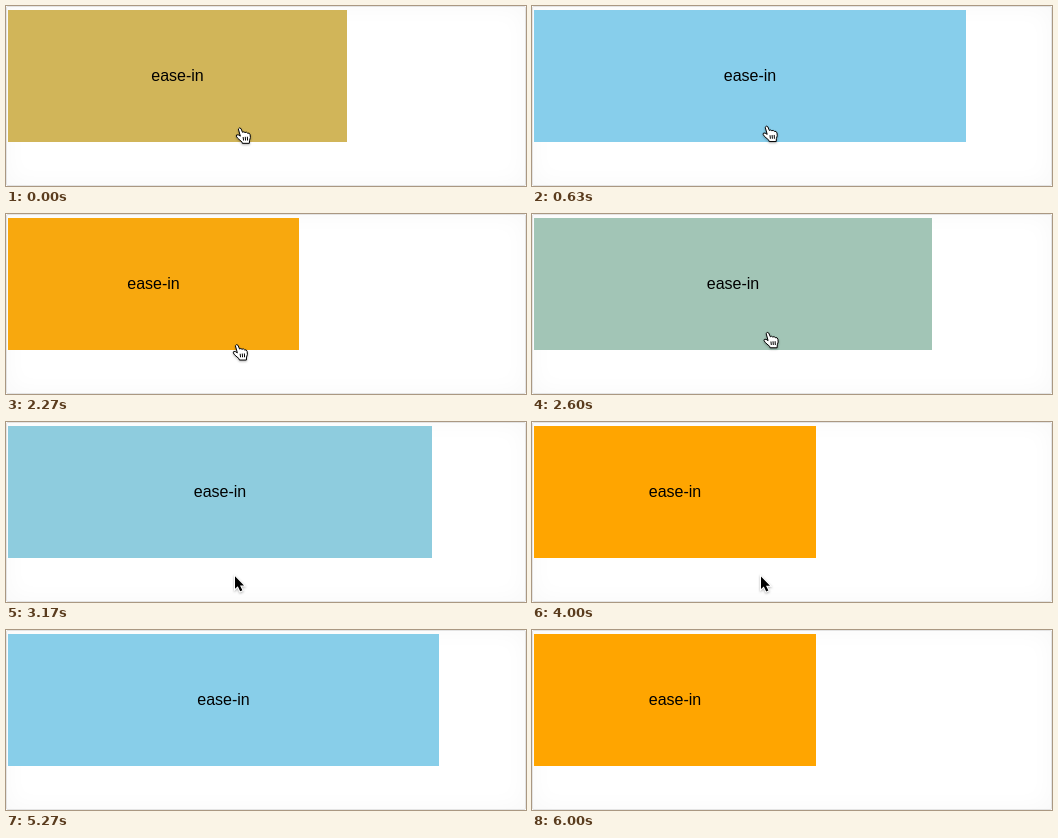
Recreate the animation shown at these times as an HTML page. Size 520 px wide and 180 px high, loop 6360 ms.

```html
<!DOCTYPE html>
<html lang="en">
<head>
<meta charset="utf-8">
<title>ease-in hover transition</title>
<style>
  html, body { margin: 0; width: 100%; height: 100%; overflow: hidden; background: #fff; }
  #frame {
    position: relative; box-sizing: border-box; width: 520px; height: 180px;
    border: 1px solid #e4e4e4; border-radius: 2px;
    box-shadow: inset 0 0 24px rgba(0, 0, 0, .03);
  }
  svg { position: absolute; left: -1px; top: -1px; }
  text { font: 16px "Liberation Sans", Arial, sans-serif; text-anchor: middle; }
  #arrow { stroke: #fff; stroke-width: 2; paint-order: stroke; }
  #hand { fill: #fff; stroke: #000; stroke-linejoin: round; }
  #cursor { filter: drop-shadow(0 1px 1px rgba(0, 0, 0, .3)); }
</style>
</head>
<body>
<div id="frame">
  <svg width="520" height="180">
    <rect id="box" x="2" y="4" height="132"/>
    <text id="label" y="75">ease-in</text>
    <g id="cursor">
      <path id="arrow" d="M0 0V12.5L2.8 9.9 5.2 15 7.4 14 5 9.2H9Z"/>
      <path id="hand" d="M-1.6 1.5Q-.6 -.4 1 1L2.6 4.8Q4 3.6 5 5 6.6 4 7.5 5.6 9.6 5 10.2 7.2 11 10 9.6 12.8L9.4 15.8H2.4L2 14.4-2.4 10.6Q-4.4 8.2 -3.4 7.4-2 6.6 .4 8.6ZM3.2 9.5L3.6 13M5.3 9.3L5.6 13M7.4 9.2L7.6 13"/>
    </g>
  </svg>
</div>
<script>
const LOOP = 6360, DURATION = 500;
const ORANGE = [255, 165, 0], SKY = [135, 206, 235];

// Times at which the pointer alternately enters and leaves the box
const toggles = [-278, 701, 2172, 3078, 4234, 5234];

// Pointer rest positions; it finally leaves through the bottom of the stage
const INSIDE = [236, 117.5], OUTSIDE = [229, 154.5], EXIT_Y = 215;

const $ = id => document.getElementById(id);
const mix = (a, b, k) => a + (b - a) * k;
const clamp = x => Math.min(1, Math.max(0, x));
const smooth = x => x * x * (3 - 2 * x);
const easeOut = x => 1 - (1 - x) ** 2;
const entering = i => i % 2 === 0;

// cubic-bezier(.42, 0, 1, 1)
function easeIn(x) {
  let low = 0, high = 1, s;
  for (let i = 0; i < 24; i++) {
    s = (low + high) / 2;
    const bx = 1.26 * s * (1 - s) ** 2 + 3 * s * s * (1 - s) + s ** 3;
    if (bx < x) low = s; else high = s;
  }
  return smooth(s);
}

// Slow glide in, quick glide out, each starting before the box edge is crossed
function pointerAt(t) {
  const glideStart = i => toggles[i] - (entering(i) ? 190 : 100);
  const i = toggles.findLastIndex((_, n) => glideStart(n) <= t);
  const since = t - glideStart(i);
  const inside = entering(i) ? easeOut(clamp(since / 700)) : 1 - smooth(clamp(since / 200));
  const outsideY = i === toggles.length - 1 ? EXIT_Y : OUTSIDE[1];
  return [mix(OUTSIDE[0], INSIDE[0], inside ** 3), mix(outsideY, INSIDE[1], inside)];
}

function draw(t) {
  const last = toggles.findLastIndex(start => start <= t);
  const hovered = entering(last);
  const eased = easeIn(clamp((t - toggles[last]) / DURATION));
  const k = hovered ? eased : 1 - eased;

  const width = Math.round(mix(282, 432, k));
  $("box").setAttribute("width", width);
  $("box").setAttribute("fill", `rgb(${ORANGE.map((c, i) => Math.round(mix(c, SKY[i], k)))})`);
  $("label").setAttribute("x", 2 + width / 2);

  $("cursor").setAttribute("transform", `translate(${pointerAt(t)})`);
  $("hand").style.display = hovered ? "" : "none";
  $("arrow").style.display = hovered ? "none" : "";
}

const begin = performance.now();
function tick() {
  draw((performance.now() - begin) % LOOP);
  requestAnimationFrame(tick);
}
tick();
</script>
</body>
</html>
```
